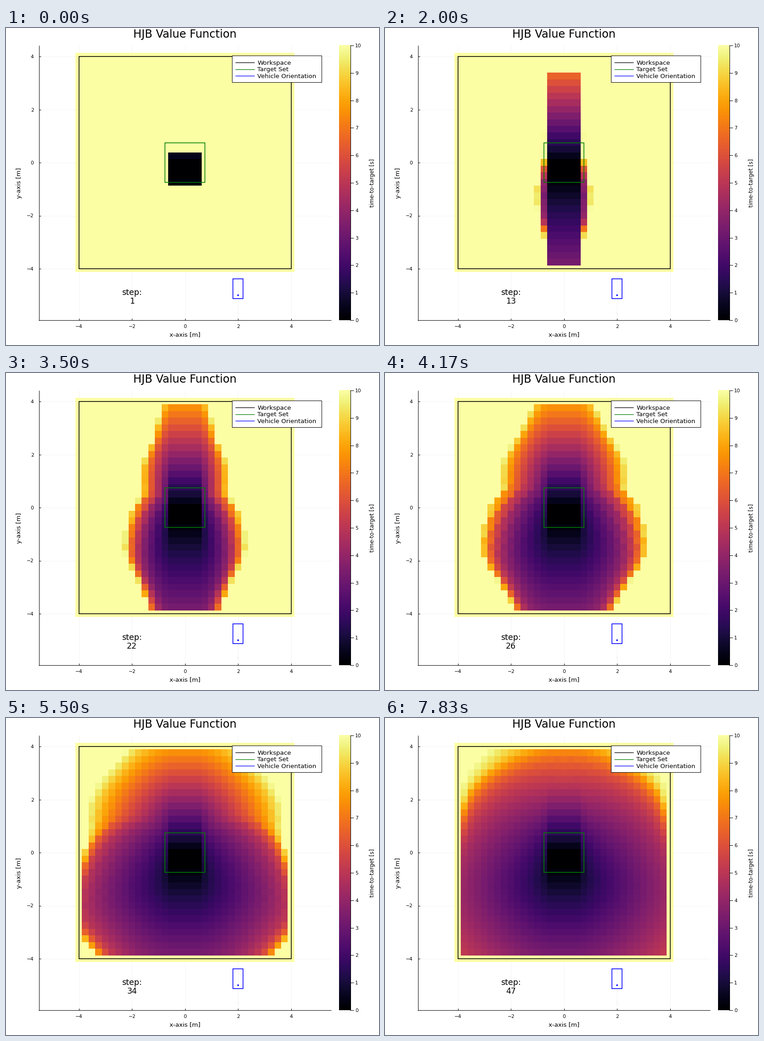
A matplotlib script for the animation above (8 s loop, 812 by 690 pixels).

```python
import numpy as np
import matplotlib.pyplot as plt
from matplotlib.animation import FuncAnimation
from matplotlib.patches import Rectangle, Circle

W, H, DPI = 812, 690, 100
STEPS, LOOP_MS = 48, 8000
PT = 72 / DPI                       # points per pixel

# vehicle and grid
V_FWD, V_REV, STEER, WHEELBASE = 1.0, 0.5, 0.475, 0.5
REAR, FRONT, HALF_W = -0.125, 0.625, 0.1875
CELL, SIZE, HEADINGS = 0.25, 33, 36
TARGET, UNREACHED, T_MAX = 0.75, 50.0, 10.0
UP = HEADINGS // 4                  # index of the heading along +y

grid = (np.arange(SIZE) - SIZE // 2) * CELL
angles = np.arange(HEADINGS) * 2 * np.pi / HEADINGS
cos = np.round(np.cos(angles), 12)
sin = np.round(np.sin(angles), 12)
turn = CELL / (2 * np.pi / HEADINGS) * np.tan(STEER) / WHEELBASE


def initial_value():
    """Zero where the whole vehicle fits the target, large elsewhere."""
    gx, gy = np.meshgrid(grid, grid)
    value = np.full((HEADINGS, SIZE, SIZE), UNREACHED)
    for k in range(HEADINGS):
        fits = np.ones((SIZE, SIZE), bool)
        for a in (REAR, FRONT):
            for b in (-HALF_W, HALF_W):
                x = gx + a * cos[k] - b * sin[k]
                y = gy + a * sin[k] + b * cos[k]
                fits &= (abs(x) <= TARGET + 1e-9) & (abs(y) <= TARGET + 1e-9)
        value[k][fits] = 0
    return value


def update(value):
    """One upwind sweep of the time-to-target equation."""
    new = value.copy()
    inner = slice(1, -1)
    for k in range(HEADINGS):
        c, s = abs(cos[k]), abs(sin[k])
        left, right = value[k - 1], value[(k + 1) % HEADINGS]
        side = np.minimum(left, right)
        best = value[k]
        for way, speed in ((1, V_FWD), (-1, V_REV)):
            dx, dy = int(way * np.sign(cos[k])), int(way * np.sign(sin[k]))
            flow = (CELL / speed + c * np.roll(value[k], -dx, 1)
                    + s * np.roll(value[k], -dy, 0))
            best = np.minimum(best, flow / (c + s))
            best = np.minimum(best, (flow + turn * side) / (c + s + turn))
        new[k, inner, inner] = best[inner, inner]
    return new


def solve():
    value, fields = initial_value(), []
    for _ in range(STEPS):
        value = update(value)
        fields.append(value[UP].copy())
    return fields


def px(x):
    return 389.7 + 57.75 * x


def py(y):
    return 293.1 - 57.71 * y


fields = solve()

plt.rcParams["font.family"] = "DejaVu Sans"
# the small margin keeps the pixel size from rounding down
fig = plt.figure(figsize=((W + 0.01) / DPI, (H + 0.01) / DPI), dpi=DPI,
                 facecolor="white")
ax = fig.add_axes([0, 0, 1, 1])
ax.axis("off")


def line(xs, ys, color="black", width=1.0, z=3):
    ax.plot(xs, ys, color=color, lw=width * PT, zorder=z,
            solid_capstyle="butt", solid_joinstyle="miter")


def label(x, y, text, size, ha="center", **kw):
    return ax.text(x, y, text, fontsize=size * PT, ha=ha, va="baseline",
                   zorder=8, **kw)


def box(x0, y0, x1, y1, color, width):
    ax.add_patch(Rectangle((px(x0), py(y0)), px(x1) - px(x0), py(y1) - py(y0),
                           fill=False, ec=color, lw=width * PT, zorder=4))


LEFT, RIGHT, TOP, BOTTOM = 71.5, 708, 38, 636.5

# grid, axes and ticks
for v in range(-4, 5, 2):
    name = str(v).replace("-", "\u2212")
    line([px(v)] * 2, [TOP, BOTTOM], "#f0f0f0", 0.8, 0)
    line([LEFT, RIGHT], [py(v)] * 2, "#f0f0f0", 0.8, 0)
    line([px(v)] * 2, [BOTTOM, BOTTOM - 4])
    line([LEFT, LEFT + 4], [py(v)] * 2)
    label(px(v), 652.8, name, 10.67)
    label(60.5, py(v) + 3.9, name, 10.67, "right")
line([LEFT, LEFT], [TOP, BOTTOM + 0.5])
line([LEFT - 0.5, RIGHT], [BOTTOM, BOTTOM])

label(389.7, 21.3, "HJB Value Function", 24)
label(389.7, 670.6, "x-axis [m]", 13.33)


def upright(x, text, size):
    ax.text(x, 337, text, fontsize=size * PT, rotation=90, ha="right",
            va="center", zorder=8)


upright(35.2, "y-axis [m]", 13.33)
upright(804, "time-to-target [s]", 12.1)

# value map
edge = 4 + CELL / 2
heat = ax.imshow(fields[0], cmap="inferno", vmin=0, vmax=T_MAX,
                 origin="lower", interpolation="nearest", aspect="auto",
                 extent=(px(-edge), px(edge), py(-edge), py(edge)), zorder=1)

# colour bar
ax.imshow(np.linspace(0, 1, 256)[:, None], cmap="inferno", origin="lower",
          aspect="auto", interpolation="nearest",
          extent=(724.5, 749, 636, 38), zorder=1)
line([749.5, 749.5], [38, 636.5])
for v in range(11):
    y = 636 - 59.8 * v
    line([749, 757], [y, y])
    label(760, y + 3.9, str(v), 10.67, "left")

# workspace, target and vehicle
box(-4, -4, 4, 4, "black", 1.6)
box(-TARGET, -TARGET, TARGET, TARGET, "green", 1.6)
box(2 - HALF_W, -5 + REAR, 2 + HALF_W, -5 + FRONT, "blue", 1.6)
ax.add_patch(Circle((px(2), py(-5)), 1.8, fc="blue", ec="none", zorder=5))
ax.add_patch(Circle((px(2), 620), 1.8, fc="white", ec="#eeeeee",
                    lw=0.8 * PT, zorder=2))

# legend
ax.add_patch(Rectangle((491.5, 60.5), 195.5, 58, fc="white", ec="black",
                       lw=PT, zorder=6))
for y, color, text in ((75.2, "black", "Workspace"),
                       (89.7, "green", "Target Set"),
                       (104.2, "blue", "Vehicle Orientation")):
    line([499, 541], [y, y], color, 1.3, 7)
    label(547.3, y + 4.7, text, 13.33, "left")

label(px(-2), 581.3, "step:", 17.33)
count = label(px(-2), 599.6, "1", 17.33)

ax.set_xlim(0, W)
ax.set_ylim(H, 0)


def draw(i):
    heat.set_data(fields[i])
    count.set_text(str(i + 1))
    return heat, count


anim = FuncAnimation(fig, draw, frames=STEPS, interval=LOOP_MS / STEPS,
                     repeat=True, repeat_delay=0, blit=False)
plt.show()
```
